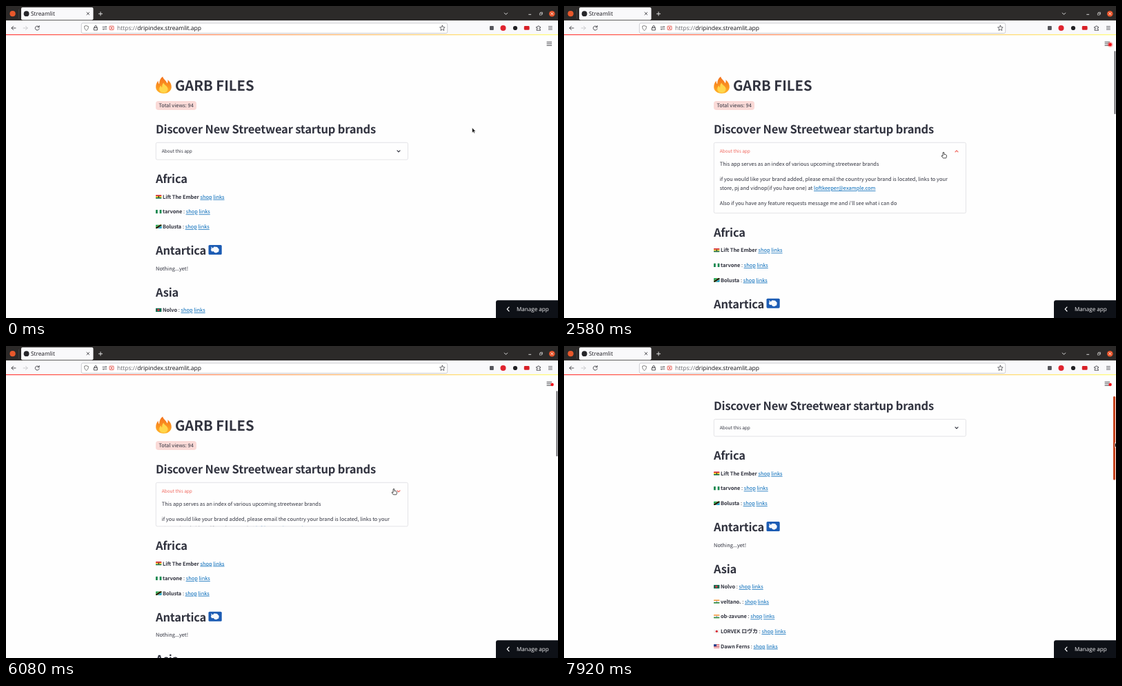
Animation, 800 px wide and 453 px high, one loop 8 s. Source, as an HTML page:

```html
<!DOCTYPE html>
<html lang="en">
<head>
<meta charset="utf-8">
<title>Streamlit</title>
<style>
html, body { margin: 0; width: 100%; height: 100%; overflow: hidden; background: #fefefe; }
svg { display: block; width: 100vw; height: 100vh; }
text { font-family: "Noto Sans CJK JP", "Noto Sans CJK SC", "Noto Sans CJK", "Open Sans", sans-serif; font-size: 7.46px; fill: #31333f; white-space: pre; text-rendering: geometricPrecision; }
.ui { font-family: "Open Sans", "Noto Sans", sans-serif; }
.h1 { font-size: 20.2px; font-weight: 700; }
.h2 { font-size: 16.5px; font-weight: 600; letter-spacing: -.012em; }
.b { font-weight: 600; letter-spacing: -.01em; }
.a { fill: #0068b8; text-decoration: underline; }
.line { fill: none; stroke: #3a3a40; stroke-width: .9; stroke-linecap: round; stroke-linejoin: round; }
</style>
</head>
<body>
<svg id="stage" viewBox="0 0 800 453" preserveAspectRatio="none" xmlns="http://www.w3.org/2000/svg"></svg>
<script>
const LOOP = 8000, STEP = 1000 / 12;
const OPEN_AT = 2180, CLOSE_AT = 5833, FOLD = 500, EXTRA = 78;
const DRAG_AT = 7300, GRAB_Y = 111;

// Drawing helpers
const rect = (x, y, w, h, fill, rest = '') => `<rect x="${x}" y="${y}" width="${w}" height="${h}" fill="${fill}" ${rest}/>`;
const disc = (x, y, r, fill, rest = '') => `<circle cx="${x}" cy="${y}" r="${r}" fill="${fill}" ${rest}/>`;
const line = (d, rest = '') => `<path class="line" d="${d}" ${rest}/>`;
const text = (x, y, s, cls = '', rest = '') => `<text x="${x}" y="${y}" class="${cls}" ${rest}>${s}</text>`;
const link = s => `<tspan class="a">${s}</tspan>`;

const bands = (colors, across) => colors.map((c, i) => {
  const n = colors.length;
  return across ? rect(i * 8.6 / n, 0, 8.6 / n + .02, 5.6, c) : rect(0, i * 5.6 / n, 8.6, 5.6 / n + .02, c);
}).join('');

const flags = {
  ghana: bands(['#d21f2c', '#fcd335', '#1a7046']) + disc(4.3, 2.8, .9, '#222'),
  nigeria: bands(['#16884f', '#f3f5f3', '#16884f'], true),
  tanzania: rect(0, 0, 8.6, 5.6, '#25a85a') + '<path d="M8.6 0V5.6H0Z" fill="#1a9ad0"/>' +
    '<path d="M0 5.6L8.6 0" stroke="#f3d34a" stroke-width="2.8"/><path d="M0 5.6L8.6 0" stroke="#111" stroke-width="2"/>',
  bangladesh: rect(0, 0, 8.6, 5.6, '#0f6b4f') + disc(3.9, 2.8, 1.6, '#e03442'),
  india: bands(['#f79a3e', '#f4f4f2', '#2c8a3c']) + disc(4.3, 2.8, .75, '#5468a8'),
  japan: rect(0, 0, 8.6, 5.6, '#f3f3f3') + disc(4.3, 2.8, 1.6, '#d8222c'),
  stripes: bands(['#d0333f', '#f1e9ea', '#d0333f', '#f1e9ea', '#d0333f', '#f1e9ea', '#d0333f']) + rect(0, 0, 4, 3, '#27438f')
};

const row = (y, flag, name, sep = ' : ') =>
  `<g transform="translate(217 ${y - 5.6})" clip-path="url(#flag)">${flags[flag]}</g>` +
  text(227, y, `<tspan class="b">${name}</tspan>${sep}${link('shop')} ${link('links')}`);

const flame = `<g transform="translate(217 102.5)">
  <path d="M10.2 0C10.6 3.6 15.4 5.6 16.4 9.8C17.5 8.6 17.9 6.6 17.3 4.6C21 7.6 23 11.6 22.8 15.4C22.4 21 17.6 24.4 11.5 24.4C5 24.4 .2 20.6 .2 15.2C.2 11.6 1.4 8.4 3.6 6C3.4 8.2 4 9.8 5.1 10.8C5 6.6 6.6 2.4 10.2 0Z" fill="url(#fire)"/>
  <path d="M11.2 9C12 12 17 13.6 17.6 17.4C18 21 15 23.4 11.5 23.4C7.8 23.4 5 21.2 5.2 17.8C5.3 15.6 6.4 14 7.6 13C7.8 14.4 8.4 15.4 9.2 15.8C9 13.2 9.6 10.8 11.2 9Z" fill="#ffd54a"/></g>`;

const chrome =
  rect(0, 0, 800, 22, '#2c2a29') + disc(9.6, 11.2, 4.1, '#e9582b') + rect(18.2, 5, .5, 13, '#555') +
  rect(22, 2, 104.5, 18.2, '#f9f9fb', 'rx="2"') + disc(29.6, 11.2, 3.9, '#26262a') +
  text(36, 14.3, 'Streamlit', 'ui', 'style="font-size:8.3px;fill:#15141a"') +
  line('M117 9.2l3.6 3.6M120.6 9.2l-3.6 3.6') +
  `<g stroke="#eee" stroke-width=".9" fill="none"><path d="M134 11.3h6M137 8.3v6M722 9.8l2.5 2.5 2.5-2.5M757.3 12.3h3.8"/>
   <path d="M773.4 10.4h2.9v2.7h-2.9zM774.6 10v-.8h2.9v2.8h-.8" stroke-width=".6"/></g>` +
  disc(791.3, 11.2, 4.3, '#e9542a') + line('M789.7 9.6l3.2 3.2M792.9 9.6l-3.2 3.2', 'style="stroke:#fff;stroke-width:.8"') +
  rect(0, 21, 800, 20.4, '#f9f9fb') +
  rect(109.3, 24.9, 530.4, 14.6, '#fff', 'rx="2" stroke="#bbbbc0" stroke-width=".7"') +
  line('M14 32H8M10.6 29.4L8 32l2.6 2.6') +
  line('M25.2 32h6M28.6 29.4l2.6 2.6-2.6 2.6', 'style="stroke:#c4c4c8"') +
  line('M47.8 30.4A3 3 0 1 0 48.2 33M48.2 28.6v2.2h-2.2') +
  line('M116.5 28.7l2.9 1c0 3.1-.9 4.7-2.9 5.9c-2-1.2-2.9-2.8-2.9-5.9z', 'style="stroke-width:.75;stroke:#555"') +
  line('M127.7 31.4h4.6v3.6h-4.6zM128.5 31.4v-1.2a1.5 1.5 0 0 1 3 0v1.2') +
  line('M140 30.6h6l-1.3-1.2M146 33.3h-6l1.3 1.2', 'style="stroke-width:.8"') +
  rect(150, 29.2, 6, 5.4, '#fff', 'rx=".6" stroke="#e23b32" stroke-width=".8"') +
  line('M151.9 30.8l2.2 2.2M154.1 30.8l-2.2 2.2', 'style="stroke:#e23b32"') +
  text(161, 35, '<tspan fill="#66666b">https://</tspan><tspan font-weight="500">dripindex.streamlit.app</tspan>', 'ui', 'style="font-size:8.55px;fill:#0c0c10"') +
  line('M632.4 28.2l1.1 2.5 2.7.3-2 1.8.6 2.7-2.4-1.4-2.4 1.4.6-2.7-2-1.8 2.7-.3z', 'style="stroke-width:.75"') +
  rect(701, 29.1, 5.8, 5.8, '#55555b', 'rx="1"') + disc(720.5, 31.9, 4, '#e0232e') +
  disc(738, 32, 3.1, '#202024') + rect(750.8, 29, 7.8, 5.8, '#d81f26', 'rx="1.4"') +
  line('M769 30.3h1.7a1.1 1.1 0 1 1 2.1 0h1.7v1.7a1.1 1.1 0 1 0 0 2v1.4H769v-1.7a1 1 0 1 0 0-1.8z', 'style="stroke-width:.75"') +
  line('M786.4 29.7h5M786.4 31.9h5M786.4 34.1h5', 'style="stroke-width:.75"');

const aboutText =
  text(225.7, 231.7, 'This app serves as an index of various upcoming streetwear brands') +
  text(225.7, 253.6, 'if you would like your brand added, please email the country your brand is located, links to your') +
  text(225.7, 267, `store, pj and vidnop(if you have one) at ${link('loftkeeper@example.com')}`) +
  text(225.7, 288.7, "Also if you have any feature requests message me and i'll see what i can do");

const regions =
  text(217, 257.3, 'Africa', 'h2') +
  row(279.8, 'ghana', 'Lift The Ember', ' ') + row(301.4, 'nigeria', 'tarvone') + row(323, 'tanzania', 'Bolusta') +
  text(217, 361.2, 'Antartica', 'h2') +
  rect(293.5, 347, 19.2, 14, '#1c5cb4', 'rx="1.6"') +
  '<path d="M297.4 349.2l2.2 2.6 2-2.2 4.4.4 2.8 3.2-.6 3.6-3.6 1.8-2.4-.6-1.4-1.8-2.6.2-1.4-2.4.8-1.6z" fill="#f7f9fc"/>' +
  text(217, 383.6, 'Nothing...yet!') +
  text(217, 422.2, 'Asia', 'h2') +
  row(444.2, 'bangladesh', 'Nolvo') + row(465.8, 'india', 'veltano.') + row(487.4, 'india', 'ob-zavune') +
  row(509, 'japan', 'LORVEK <tspan style="font-size:8px">ロヴカ</tspan>') + row(530.6, 'stripes', 'Dawn Ferns');

document.getElementById('stage').innerHTML = `
<defs>
  <linearGradient id="fire" x1="0" y1="0" x2="0" y2="1"><stop offset="0" stop-color="#f4721e"/><stop offset=".6" stop-color="#fb9420"/><stop offset="1" stop-color="#ffb62b"/></linearGradient>
  <linearGradient id="deco"><stop stop-color="#ff4b4b"/><stop offset="1" stop-color="#fffd80"/></linearGradient>
  <radialGradient id="glow"><stop offset=".4" stop-color="#f00" stop-opacity=".75"/><stop offset="1" stop-color="#f00" stop-opacity="0"/></radialGradient>
  <clipPath id="flag"><rect width="8.6" height="5.6" rx=".6"/></clipPath>
  <clipPath id="fold"><rect id="foldBox" x="217" y="198" width="366" height="25"/></clipPath>
</defs>
${rect(0, 0, 800, 453, '#fefefe')}
<g id="page">
  ${flame}${text(245, 123.4, 'GARB FILES', 'h1')}
  ${rect(217, 138, 59, 13, '#fadad7', 'rx="4"')}${text(221.4, 147.2, 'Total views: 94')}
  ${text(217, 185.3, 'Discover New Streetwear startup brands', 'h2')}
  <g id="about" clip-path="url(#fold)">${aboutText}</g>
  <rect id="panel" x="217.3" y="198.3" width="365.2" height="24.8" rx="2" fill="none" stroke="#d8d8dd" stroke-width=".7"/>
  ${text(225.7, 213.4, 'About this app', '', 'id="label" style="font-size:6.5px"')}
  <path id="chevron" class="line" d="M-2-1L0 1L2-1" style="stroke-width:1.2"/>
  <g id="regions">${regions}</g>
</g>
${rect(0, 41, 800, 24.2, '#fefefe')}
${chrome}
${rect(0, 41, 800, 1.3, 'url(#deco)')}
${line('M783.6 52.3h7.5M783.6 54.8h7.5M783.6 57.3h7.5', 'style="stroke-linecap:butt"')}
<g id="rec">${disc(791.6, 56, 4.8, 'url(#glow)', 'id="halo"')}${disc(791.6, 56, 2.2, '#f5141c')}</g>
<rect id="bar"/>
<path d="M800 427.2H713a3 3 0 0 0-3 3V453H800Z" fill="#0e1117"/>
${line('M729 437.2l-2.8 2.9 2.8 2.9', 'style="stroke:#fff;stroke-width:1.2"')}
${text(740, 443, 'Manage app', 'ui', 'style="font-size:8.1px;fill:#f4f4f6"')}
<path id="arrow" d="M0 0V7.2L1.7 5.7L2.7 8L3.9 7.4L2.9 5.2H5Z" fill="#111" stroke="#fff" stroke-width=".5"/>
<path id="hand" d="M-.9 .8Q0-.4 .9 .8V3.4Q4.1 3.3 4.5 4.8V6.8L3.7 8.8H-.6L-3 5.7Q-2.5 4.6-.9 5.7Z" fill="#fff" stroke="#222" stroke-width=".8" stroke-linejoin="round"/>`;

const el = {};
document.querySelectorAll('svg [id]').forEach(n => el[n.id] = n);
const set = (n, attrs) => { for (const k in attrs) n.setAttribute(k, attrs[k]); };
const show = (n, on) => n.setAttribute('visibility', on ? 'visible' : 'hidden');
const clamp = v => Math.max(0, Math.min(1, v));
const linear = p => p;
const smooth = p => p * p * (3 - 2 * p);
const quint = p => p < .5 ? 16 * p ** 5 : 1 - (2 - 2 * p) ** 5 / 2;

// Keys are [time, ...values]
function track(keys, t, ease) {
  let i = 0;
  while (i < keys.length - 2 && t >= keys[i + 1][0]) i++;
  const [a, b] = [keys[i], keys[i + 1]];
  const p = ease(clamp((t - a[0]) / (b[0] - a[0])));
  return a.slice(1).map((v, k) => v + (b[k + 1] - v) * p);
}

const mouse = [[0, 675.6, 176.8], [400, 675.6, 176.8], [1250, 548.4, 213], [1600, 548.4, 213], [2000, 550, 212],
  [3000, 550, 212], [3900, 574, 214.4], [5100, 574, 214.4], [5700, 562, 207], [6150, 562, 207], [6950, 798.5, GRAB_Y], [DRAG_AT, 798.5, GRAB_Y]];
const drag = [[DRAG_AT, 798.5, GRAB_Y], [7583, 798.5, GRAB_Y + 15], [7917, 798.5, GRAB_Y + 29.2]];
const barFade = [[0, 0], [500, 0], [700, 1], [4000, 1], [4500, 0], [5250, 0], [5450, 1], [LOOP, 1]];

function draw(t) {
  const [x, y] = t < DRAG_AT ? track(mouse, t, smooth) : track(drag, t, linear);
  const pulled = t < DRAG_AT ? 0 : y - GRAB_Y;
  const fold = quint(clamp((t - OPEN_AT) / FOLD)) - quint(clamp((t - CLOSE_AT) / FOLD));
  const extra = EXTRA * fold;
  const isOpen = t >= OPEN_AT && t < CLOSE_AT;
  const hover = x > 217 && x < 583 && y > 198 && y < 223;
  const tint = hover ? '#f0645a' : '#31333f';

  set(el.page, { transform: `translate(0 ${-pulled * 3.15})` });
  set(el.regions, { transform: `translate(0 ${extra})` });
  set(el.panel, { height: 24.8 + extra });
  set(el.foldBox, { height: 25 + extra });
  show(el.about, fold > 0);
  el.label.style.fill = tint;
  el.chevron.style.stroke = tint;
  set(el.chevron, { transform: `translate(569 210.8) scale(1 ${isOpen ? -1 : 1})` });

  const length = 411 * 411 / (1390 + extra);
  const top = 42 + pulled * 1.06, from = Math.max(65.2, top);
  const wide = x > 785;
  set(el.bar, {
    x: wide ? 795.9 : 797.6, y: from, width: wide ? 3.2 : 1.7, height: top + length - from, rx: wide ? 1.5 : .8,
    fill: t >= 7150 ? '#c5421c' : '#55555a', opacity: track(barFade, t, linear)[0]
  });

  show(el.rec, t >= 80);
  set(el.halo, { opacity: (1 - Math.cos(Math.PI * t / 1000)) / 2 });

  show(el.hand, hover);
  show(el.arrow, !hover);
  set(hover ? el.hand : el.arrow, { transform: `translate(${x} ${y})` });
}

function tick() {
  const t = performance.now() % LOOP;
  draw(Math.floor((t + 4) / STEP) * STEP % LOOP);
  requestAnimationFrame(tick);
}
tick();
</script>
</body>
</html>
```
